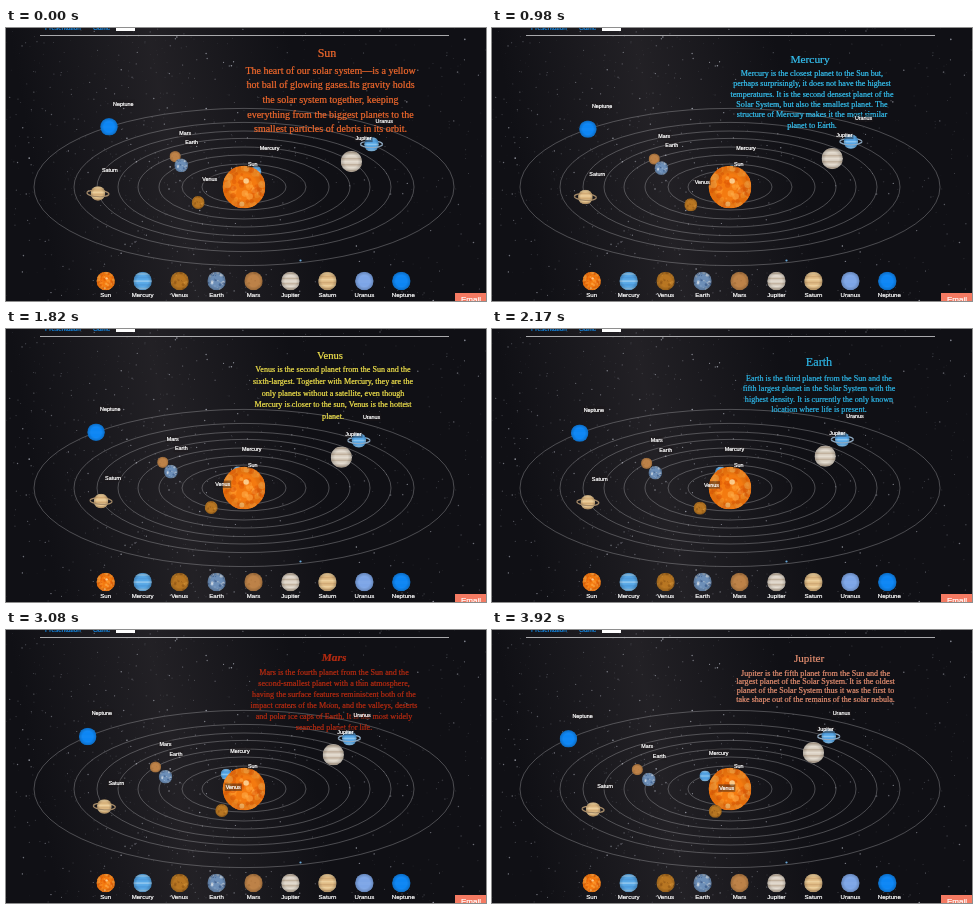
An HTML page with a canvas that plays this animation: 480x273 px, repeating every 3.99 s.

```html
<!DOCTYPE html>
<html lang="en">
<head>
<meta charset="utf-8">
<title>Solar system</title>
<style>
html, body { margin: 0; width: 100%; height: 100%; overflow: hidden; background: #101015; }
canvas { display: block; width: 480px; height: 273px; }
</style>
</head>
<body>
<canvas id="stage" width="480" height="273"></canvas>
<script>
const W = 480, H = 273, STEP = 70, LOOP = 3990, CX = 238, CY = 159;
const SANS = '"Liberation Sans", Arial, sans-serif';
const SERIF = '"Liberation Serif", "Times New Roman", serif';
const stage = document.getElementById('stage').getContext('2d');

// base colour, mark colours, and the number of spots or bands
const looks = {
  Sun: { base: '#f47a10', marks: ['#ff9a2c', '#e05a06', '#ffb04c'], spots: 90 },
  Mercury: { base: '#58a8e6', marks: ['#b4dcf6', '#4a94d6'], bands: 5 },
  Venus: { base: '#b87622', marks: ['#dc9c3c', '#8a5214'], spots: 24 },
  Earth: { base: '#6d8fb8', marks: ['#f0f4f8', '#2c4a78', '#b4bcc4'], spots: 30 },
  Mars: { base: '#bd8248', marks: ['#d09a5c', '#a06c38'], spots: 12 },
  Jupiter: { base: '#d8cec0', marks: ['#b09a84', '#eee8de'], bands: 7 },
  Saturn: { base: '#e2be88', marks: ['#f4deb0', '#c49c68'], bands: 6 },
  Uranus: { base: '#7da5e6', marks: ['#86acea'], bands: 3 },
  Neptune: { base: '#0d86f4', marks: ['#148af6'], bands: 3 }
};

// orbit radii, start angle and sweep in degrees, planet radius
const orbits = [
  { name: 'Neptune', rx: 210, ry: 78.6, from: 230, sweep: -10.3, r: 8.7 },
  { name: 'Uranus', rx: 170, ry: 64.6, from: -41.4, sweep: -13.1, r: 7.3, ring: '#8fa9c0' },
  { name: 'Saturn', rx: 147, ry: 56, from: 173.4, sweep: -14.8, r: 7.3, ring: '#a58a68' },
  { name: 'Jupiter', rx: 126, ry: 48.6, from: -31.5, sweep: -17, r: 10.6 },
  { name: 'Mars', rx: 106, ry: 40, from: 229.5, sweep: -20.5, r: 5.6 },
  { name: 'Earth', rx: 85, ry: 32, from: 222.4, sweep: -25.2, r: 6.8 },
  { name: 'Mercury', rx: 42, ry: 16.3, from: -73.6, sweep: -52.9, r: 5.5 },
  { name: 'Venus', rx: 62, ry: 23, from: 137.7, sweep: -34, r: 6.5 }
];

const cards = [
  { title: 'Sun', x: 321, y: 29, size: 12, color: '#f0682c', body: 10, top: 45.8, gap: 14.6, bx: 324.5, lines: [
    'The heart of our solar system—is a yellow', 'hot ball of glowing gases.Its gravity holds',
    'the solar system together, keeping', 'everything from the biggest planets to the',
    'smallest particles of debris in its orbit.'] },
  { title: 'Mercury', x: 318, y: 34.5, size: 11.4, color: '#35c0f0', body: 8.1, top: 48, gap: 10.35, bx: 320, lines: [
    'Mercury is the closest planet to the Sun but,', 'perhaps surprisingly, it does not have the highest',
    'temperatures. It is the second densest planet of the', 'Solar System, but also the smallest planet. The',
    'structure of Mercury makes it the most similar', 'planet to Earth.'] },
  { title: 'Venus', x: 324, y: 29.5, size: 10.6, color: '#f2e34c', body: 8.1, top: 43, gap: 11.75, bx: 327, lines: [
    'Venus is the second planet from the Sun and the', 'sixth-largest. Together with Mercury, they are the',
    'only planets without a satellite, even though', 'Mercury is closer to the sun, Venus is the hottest',
    'planet.'] },
  { title: 'Earth', x: 327, y: 37, size: 12.2, color: '#2cb5e6', body: 8.1, top: 52, gap: 10.4, bx: 327, lines: [
    'Earth is the third planet from the Sun and the', 'fifth largest planet in the Solar System with the',
    'highest density. It is currently the only known', 'location where life is present.'] },
  { title: 'Mars', x: 328, y: 30.5, size: 11.4, style: 'italic bold', color: '#b52a10', body: 8.1, top: 44.8, gap: 11.05, bx: 328, lines: [
    'Mars is the fourth planet from the Sun and the', 'second-smallest planet with a thin atmosphere,',
    'having the surface features reminiscent both of the', 'impact craters of the Moon, and the valleys, deserts',
    'and polar ice caps of Earth. It is the most widely', 'searched planet for life.'] },
  { title: 'Jupiter', x: 317, y: 31.5, size: 11.1, color: '#e48e70', body: 8.1, top: 45.8, gap: 8.6, bx: 323.5, lines: [
    'Jupiter is the fifth planet from the Sun and the', 'largest planet of the Solar System. It is the oldest',
    'planet of the Solar System thus it was the first to', 'take shape out of the remains of the solar nebula.'] }
];

function seeded(seed) {
  return () => (seed = (seed * 16807) % 2147483647) / 2147483647;
}

function disc(c, x, y, r, color) {
  c.fillStyle = color;
  c.beginPath();
  c.arc(x, y, r, 0, 7);
  c.fill();
}

// a hairline stroke gives the slightly heavy look of the lettering
function text(c, str, x, y, font, color, align = 'center') {
  c.font = font;
  c.fillStyle = c.strokeStyle = color;
  c.textAlign = align;
  c.lineWidth = 0.22;
  c.fillText(str, x, y);
  c.strokeText(str, x, y);
}

function sphere(c, name, x, y, r) {
  const { base, marks, spots = 0, bands = 0 } = looks[name];
  const random = seeded(7919);
  c.save();
  c.beginPath();
  c.arc(x, y, r, 0, 7);
  c.clip();
  c.fillStyle = base;
  c.fillRect(x - r, y - r, 2 * r, 2 * r);
  c.globalAlpha = 0.55;
  for (let i = 0; i < spots; i++) {
    const a = random() * 7, d = r * Math.sqrt(random());
    disc(c, x + d * Math.cos(a), y + d * Math.sin(a), r * (0.04 + 0.13 * random()), marks[i % marks.length]);
  }
  for (let i = 0; i < bands; i++) {
    c.fillStyle = marks[i % marks.length];
    c.fillRect(x - r, y - r + (i + 0.3) * 2 * r / bands, 2 * r, r / bands);
  }
  c.globalAlpha = 1;
  if (name === 'Sun') {
    disc(c, x + r * 0.1, y - r * 0.28, r * 0.13, '#ffe2a8cc');
    disc(c, x - r * 0.1, y + r * 0.8, r * 0.12, '#ffd890aa');
  }
  const shade = c.createRadialGradient(x, y, r * 0.6, x, y, r);
  shade.addColorStop(0, '#0000');
  shade.addColorStop(1, name === 'Sun' ? '#d0500044' : '#0003');
  c.fillStyle = shade;
  c.fillRect(x - r, y - r, 2 * r, 2 * r);
  c.restore();
}

function ringHalf(c, { x, y, r, ring, name }, start) {
  c.strokeStyle = ring;
  c.lineWidth = 1.3;
  c.beginPath();
  c.ellipse(x, y, r * 1.5, r * 0.45, name === 'Saturn' ? 0.06 : 0, start, start + Math.PI);
  c.stroke();
}

function label(name, x, y) {
  stage.font = '5.4px ' + SANS;
  const width = stage.measureText(name).width;
  stage.fillStyle = '#1c181a70';
  stage.fillRect(x + 3, y - 27, width + 2, 7.5);
  text(stage, name, x + 4, y - 21.2, stage.font, '#fff', 'left');
}

function drawSky(c) {
  const random = seeded(4242);
  c.fillStyle = '#101015';
  c.fillRect(0, 0, W, H);
  const haze = c.createLinearGradient(30, 150, 300, 100);
  haze.addColorStop(0, '#3a363a00');
  haze.addColorStop(0.5, '#3a363a70');
  haze.addColorStop(1, '#3a363a00');
  c.fillStyle = haze;
  c.fillRect(0, 0, W, H);
  for (let i = 0; i < 1000; i++) {
    const y = random() * H;
    const spread = random() + random() + random() - 1.5;
    const x = i % 3 ? random() * W : 130 + y * 0.2 + spread * 110;
    c.globalAlpha = 0.12 + 0.6 * random() ** 3;
    disc(c, x, y, 0.35 + 0.5 * random() ** 2, '#cfd2de');
  }
  c.globalAlpha = 1;
  disc(c, 294.5, 232.5, 1.1, '#6aa8d8');
}

function makeBackdrop() {
  const canvas = document.createElement('canvas');
  canvas.width = W;
  canvas.height = H;
  const c = canvas.getContext('2d');
  drawSky(c);

  c.strokeStyle = '#c8c8cc78';
  c.lineWidth = 0.7;
  for (const { rx, ry } of orbits) {
    c.beginPath();
    c.ellipse(CX, CY, rx, ry, 0, 0, 7);
    c.stroke();
  }

  c.fillStyle = '#a9a9ac';
  c.fillRect(34, 7, 409, 1);
  text(c, 'Presentation', 39, 2, '6.4px ' + SANS, '#1687e0', 'left');
  text(c, 'Game', 87, 2, '6.4px ' + SANS, '#1687e0', 'left');
  c.fillStyle = '#fff';
  c.fillRect(110, 0, 19, 3);
  c.fillStyle = '#f47a62';
  c.fillRect(449, 265, 31, 8);
  text(c, 'Email', 465, 274, '8px ' + SANS, '#fff');

  Object.keys(looks).forEach((name, i) => {
    const x = 99.7 + i * 36.95;
    sphere(c, name, x, 253, 9.2);
    text(c, name, x + (name === 'Neptune' ? 2 : 0), 269, '6.1px ' + SANS, '#fff');
  });
  return canvas;
}

function drawCard({ title, x, y, size, style = '', color, body, top, gap, bx, lines }) {
  text(stage, title, x, y, `${style} ${size}px ${SERIF}`, color);
  lines.forEach((line, i) => text(stage, line, bx, top + i * gap, `${body}px ${SERIF}`, color));
}

function draw(time) {
  const progress = time / 3920;
  stage.drawImage(backdrop, 0, 0);
  drawCard(cards[Math.min(5, Math.floor(time / 700))]);
  const planets = orbits.map(o => {
    const a = (o.from + o.sweep * progress) * Math.PI / 180;
    return { ...o, x: CX + o.rx * Math.cos(a), y: CY + o.ry * Math.sin(a) };
  });
  for (const p of planets) {
    if (p.name === 'Venus') sphere(stage, 'Sun', CX, CY, 21.3);
    if (p.ring) ringHalf(stage, p, Math.PI);
    sphere(stage, p.name === 'Uranus' ? 'Mercury' : p.name, p.x, p.y, p.r);
    if (p.ring) ringHalf(stage, p, 0);
  }
  label('Sun', CX, CY);
  for (const { name, x, y } of planets) label(name, x, y);
}

const backdrop = makeBackdrop();
function tick() {
  const time = performance.now() % LOOP;
  draw(Math.floor(time / STEP) * STEP);
  requestAnimationFrame(tick);
}
tick();
</script>
</body>
</html>
```
